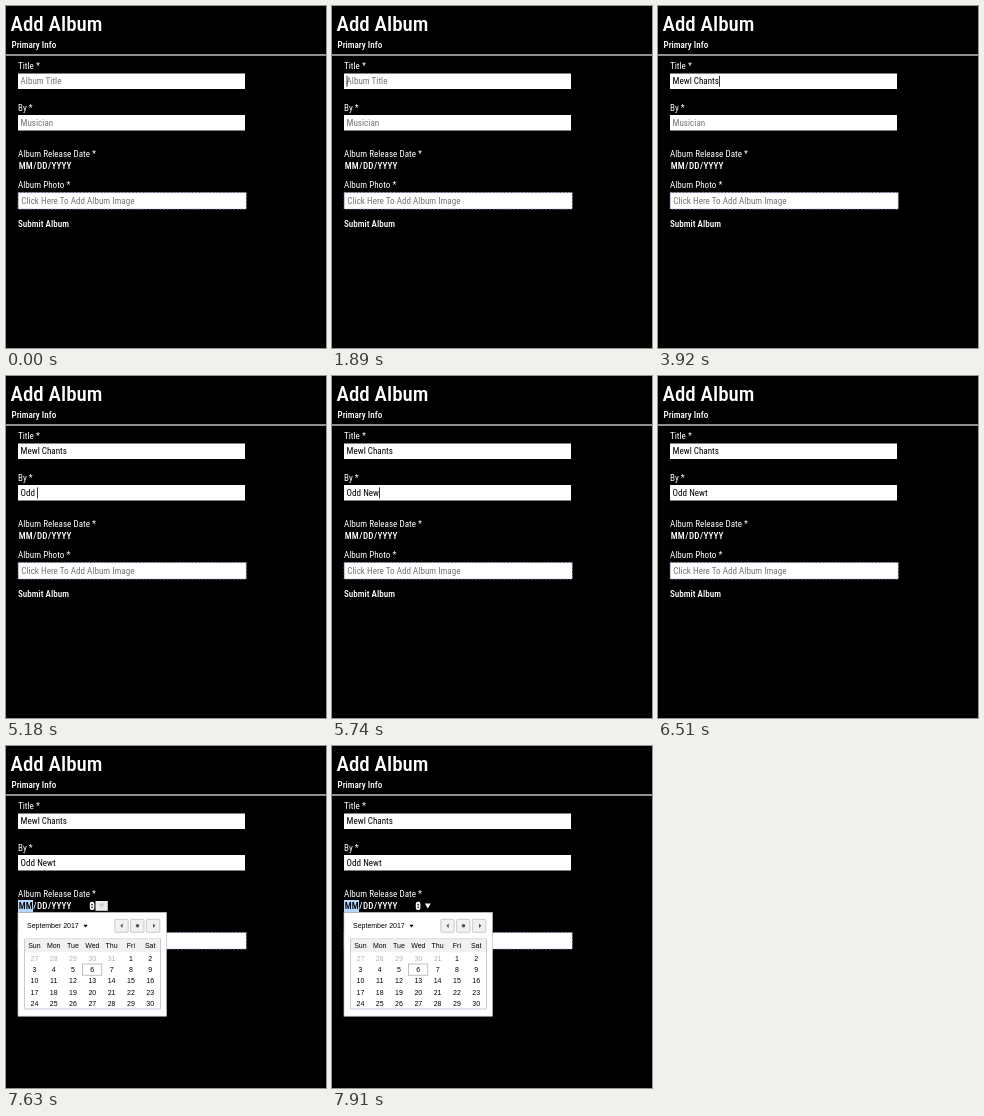
An HTML page that plays this animation: 320x342 px, repeating every 8 s.

```html
<!DOCTYPE html>
<html lang="en">
<head>
<meta charset="utf-8">
<style>
html, body { margin: 0; width: 100%; height: 100%; overflow: hidden; background: #000; }
svg { display: block; width: 320px; height: 342px; }
text { font-family: "Roboto Condensed", Roboto, sans-serif; font-stretch: 75%; font-size: 9.1px; fill: #fff; white-space: pre; }
.strong { font-weight: 500; }
.hint { fill: #757575; }
.ink { fill: #000; }
#calendar text { font-family: "Liberation Sans", Arial, sans-serif; font-stretch: normal; font-size: 7px; fill: #000; }
#days text { text-anchor: middle; }
#calendar .dim { fill: #b4b4b4; }
</style>
</head>
<body>
<svg viewBox="0 0 320 342">
  <rect width="320" height="342"/>
  <text class="strong" x="4.5" y="25" style="font-size:21px">Add Album</text>
  <text class="strong" x="5.5" y="42">Primary Info</text>
  <rect y="48.4" width="320" height="1.2" fill="#eee"/>

  <text x="12" y="63">Title *</text>
  <rect x="12" y="67.5" width="227" height="15.5" fill="#fff"/>
  <text x="12" y="105">By *</text>
  <rect x="12" y="109" width="227" height="15.5" fill="#fff"/>
  <g id="fields"></g>

  <text x="12" y="151">Album Release Date *</text>
  <rect id="focus" x="12" y="154" width="15" height="12" fill="#b3d7fe"/>
  <text id="month" class="strong" x="12.8" y="163.2">MM</text>
  <text class="strong" x="27.2" y="163.2">/</text>
  <text class="strong" x="31" y="163.2">DD</text>
  <text class="strong" x="42" y="163.2">/</text>
  <text class="strong" x="45.6" y="163.2">YYYY</text>
  <g id="tools">
    <rect x="83.8" y="155.8" width="4.6" height="8.2" rx="2" fill="#fff"/>
    <path d="M84.9 159.2l1.2-1.8 1.2 1.8zM84.9 160.7l1.2 1.8 1.2-1.8z"/>
    <rect id="hot" x="89.5" y="155" width="12.3" height="9.8" fill="#eee"/>
    <path id="arrow" d="M92.8 157.5h6l-3 5z" fill="#fff"/>
  </g>

  <text x="12" y="182">Album Photo *</text>
  <rect x="12.2" y="186.6" width="228" height="16.4" fill="#fff" stroke="#b9a9d6" stroke-width=".8" stroke-dasharray="2 1.5"/>
  <text class="hint" x="15.3" y="198.4">Click Here To Add Album Image</text>
  <text class="strong" x="12" y="220.5">Submit Album</text>

  <g id="calendar">
    <rect x="12" y="166.4" width="148.4" height="103.8" fill="#fff" stroke="#bfbfbf" stroke-width=".7"/>
    <text x="21" y="182.4">September 2017</text>
    <path d="M77.3 178.8h4.4l-2.2 2.6z"/>
    <g id="buttons"></g>
    <path d="M116.7 177.5v4.6l-2.4-2.3zM147 177.5v4.6l2.4-2.3z" fill="#555"/>
    <circle cx="131.5" cy="179.8" r="1.8" fill="#555"/>
    <rect x="18.6" y="193" width="135.8" height="70" fill="#fff" stroke="#b5c0cf" stroke-width=".8"/>
    <rect x="19" y="193.4" width="135" height="12.8" fill="#f1f1f1"/>
    <rect x="76.4" y="218" width="19.4" height="11.2" fill="#fff" stroke="#a5a5a5" stroke-width=".7"/>
    <g id="days"></g>
  </g>
</svg>
<script>
const LOOP = 8000;
const $ = id => document.getElementById(id);

function add(parent, tag, attrs, content = '') {
  const el = document.createElementNS('http://www.w3.org/2000/svg', tag);
  for (const key in attrs) el.setAttribute(key, attrs[key]);
  el.textContent = content;
  return parent.appendChild(el);
}
const show = (el, on) => el.setAttribute('visibility', on ? 'visible' : 'hidden');

// keys holds the moment at which each letter is typed
const fields = [
  { value: 'Mewl Chants', hint: 'Album Title', y: 78.3, from: 1890, to: 4270,
    keys: [2380, 2660, 2800, 2870, 3010, 3220, 3430, 3500, 3710, 3780, 3920] },
  { value: 'Odd Newt', hint: 'Musician', y: 120, from: 4270, to: 7420,
    keys: [4760, 4970, 5040, 5180, 5460, 5670, 5740, 5950] }
];
for (const f of fields) {
  f.text = add($('fields'), 'text', { x: 14.6, y: f.y });
  f.caret = add($('fields'), 'rect', { y: f.y - 8.6, width: .8, height: 11 });
}

for (let i = 0; i < 3; i++) {
  add($('buttons'), 'rect', { x: 108.8 + i * 15.8, y: 173.3, width: 13.4, height: 13, rx: 1,
    fill: '#f1f1f1', stroke: '#b8b8b8', 'stroke-width': .7 });
}
'Sun Mon Tue Wed Thu Fri Sat'.split(' ').forEach((name, i) =>
  add($('days'), 'text', { x: 28.4 + i * 19.3, y: 202.3 }, name));
for (let i = 0; i < 35; i++) {
  const past = i < 5;
  add($('days'), 'text', {
    x: 28.4 + i % 7 * 19.3,
    y: 214.6 + Math.floor(i / 7) * 11.35,
    class: past ? 'dim' : ''
  }, past ? 27 + i : i - 4);
}

function drawField(f, t) {
  const count = f.keys.filter(k => k <= t).length;
  f.text.textContent = count ? f.value.slice(0, count) : f.hint;
  f.text.setAttribute('class', count ? 'ink' : 'hint');
  const width = count ? f.text.getComputedTextLength() : 0;
  f.caret.setAttribute('x', 14.6 + width);
  const last = count ? f.keys[count - 1] : f.from;
  const lit = Math.floor((t - last) / 495) % 2 === 0;
  show(f.caret, t >= f.from && t < f.to && lit);
}

function draw(t) {
  fields.forEach(f => drawField(f, t));
  const hot = t >= 7140 && t < 7910;
  show($('tools'), (t >= 6300 && t < 6510) || t >= 7070);
  $('hot').setAttribute('opacity', hot ? 1 : 0);
  $('arrow').setAttribute('fill', hot ? '#d2d2d2' : '#fff');
  show($('focus'), t >= 7420);
  $('month').setAttribute('class', t >= 7420 ? 'strong ink' : 'strong');
  show($('calendar'), t >= 7630);
}

const start = performance.now();
function tick() {
  draw((performance.now() - start) % LOOP);
  requestAnimationFrame(tick);
}
tick();
</script>
</body>
</html>
```
